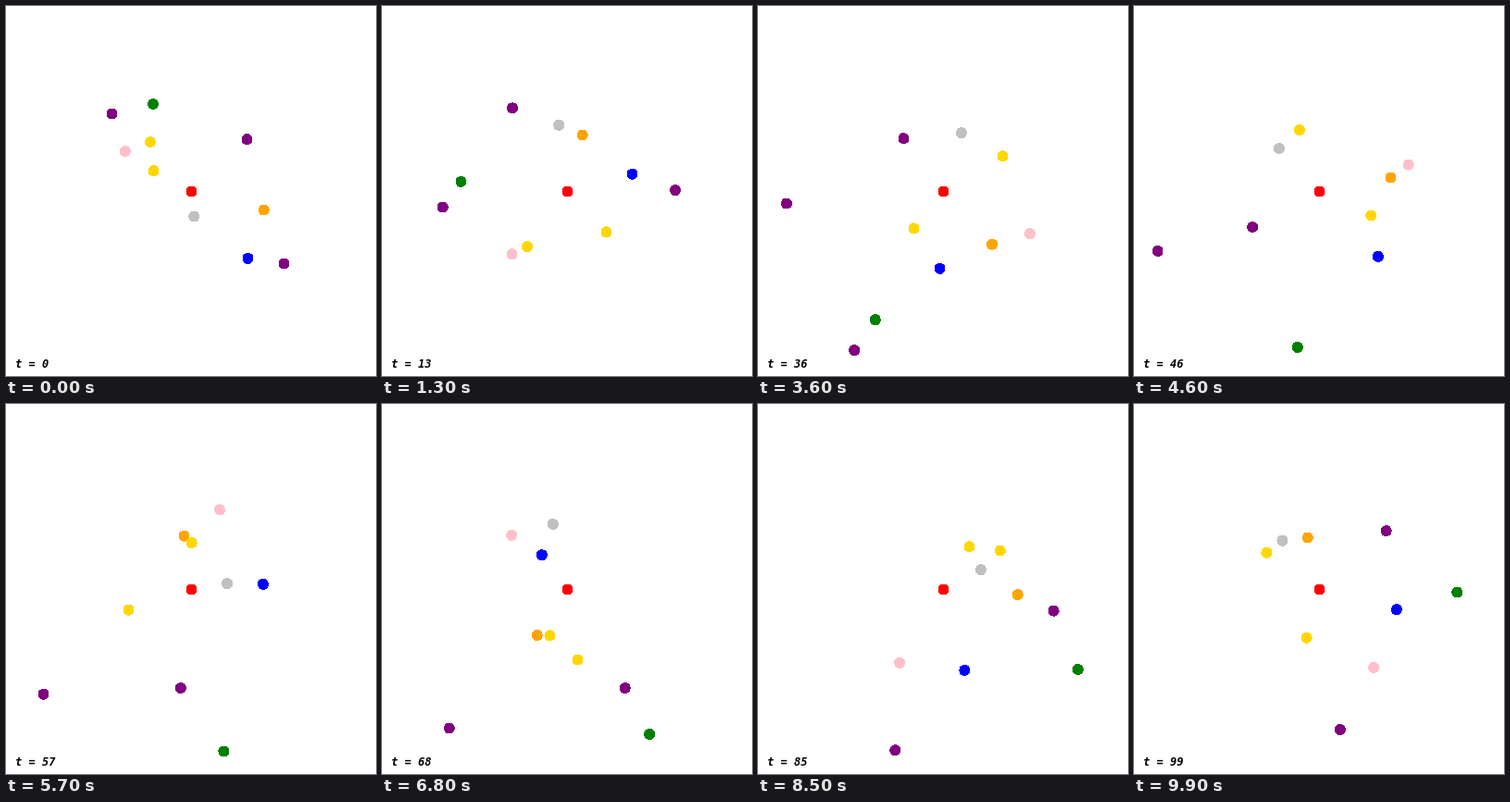
Recreate the animation shown at these times as a matplotlib script. Size 400 by 400 pixels, loop 10000 ms.

```python
import numpy as np
import matplotlib.pyplot as plt
from matplotlib.animation import FuncAnimation
from matplotlib.patches import Circle

SIZE = 400
FRAMES = 100
SUN = np.array([200.5, 200.5])
RADIUS = 5.4
MU = 6674.0  # pull of the sun, px^3 / s^2
DT = 0.1     # tick of the clock

# colour, start relative to the sun, period
PLANETS = [
    ("silver", 2.7, 26.95, 26.98),
    ("blue", 60.95, 72.4, 45.54),
    ("orange", 78.3, 20.0, 41.65),
    ("pink", -71.8, -43.4, 70.04),
    ("gold", -44.5, -53.5, 48.62),
    ("gold", -40.95, -22.4, 30.58),
    ("green", -41.5, -94.5, 129.7),
    ("purple", 99.9, 77.9, 75.7),
    ("purple", 60.0, -56.4, 127.35),
    ("purple", -86.0, -84.0, 249.8),
]


class Orbit:
    """Kepler ellipse around the sun, run counter-clockwise."""

    def __init__(self, x, y, period):
        self.rate = 2 * np.pi / period
        self.axis = (MU / self.rate ** 2) ** (1 / 3)
        # Launched sideways, with half a tick of fall towards the sun.
        r = np.hypot(x, y)
        fall = -MU / r ** 2 * DT / 2
        side = np.sqrt(MU * (2 / r - 1 / self.axis) - fall ** 2)
        p = (r * side) ** 2 / MU
        ec, es = p / r - 1, fall * np.sqrt(p / MU)
        self.e = e = np.hypot(ec, es)
        true = np.arctan2(es, ec)
        self.peri = np.arctan2(y, x) + true
        ecc = 2 * np.arctan2(np.sqrt(1 - e) * np.sin(true / 2),
                             np.sqrt(1 + e) * np.cos(true / 2))
        self.phase = ecc - e * np.sin(ecc)

    def at(self, t):
        mean = self.phase + self.rate * t
        ecc = mean
        for _ in range(12):
            ecc -= ((ecc - self.e * np.sin(ecc) - mean)
                    / (1 - self.e * np.cos(ecc)))
        u = self.axis * (np.cos(ecc) - self.e)
        v = self.axis * np.sqrt(1 - self.e ** 2) * np.sin(ecc)
        c, s = np.cos(self.peri), np.sin(self.peri)
        return SUN + (u * c + v * s, u * s - v * c)


def tick_times():
    """Time of the first tick at or after each second.

    The clock adds up DT, so rounding makes some seconds a tick late.
    """
    clock, ticks, times = 0.0, 0, []
    for second in range(FRAMES):
        while clock < second:
            clock += DT
            ticks += 1
        times.append(ticks * DT)
    return times


fig = plt.figure(figsize=(4, 4), dpi=100, facecolor="white")
ax = fig.add_axes([0, 0, 1, 1])
ax.set_xlim(0, SIZE)
ax.set_ylim(SIZE, 0)
ax.axis("off")


def disc(color):
    return ax.add_patch(Circle(SUN, RADIUS, facecolor=color,
                               edgecolor="none", antialiased=False))


disc("red")
planets = [(Orbit(*start), disc(color)) for color, *start in PLANETS]
label = ax.text(10, 391, "", family="DejaVu Sans Mono", size=8.64,
                weight="bold", style="italic", color="black", va="baseline")
times = tick_times()


def draw(i):
    for orbit, mark in planets:
        mark.center = orbit.at(times[i])
    label.set_text(f"t = {i}")
    return [mark for _, mark in planets] + [label]


anim = FuncAnimation(fig, draw, frames=FRAMES, interval=100, repeat=True,
                     repeat_delay=0, init_func=lambda: draw(0))
plt.show()
```
